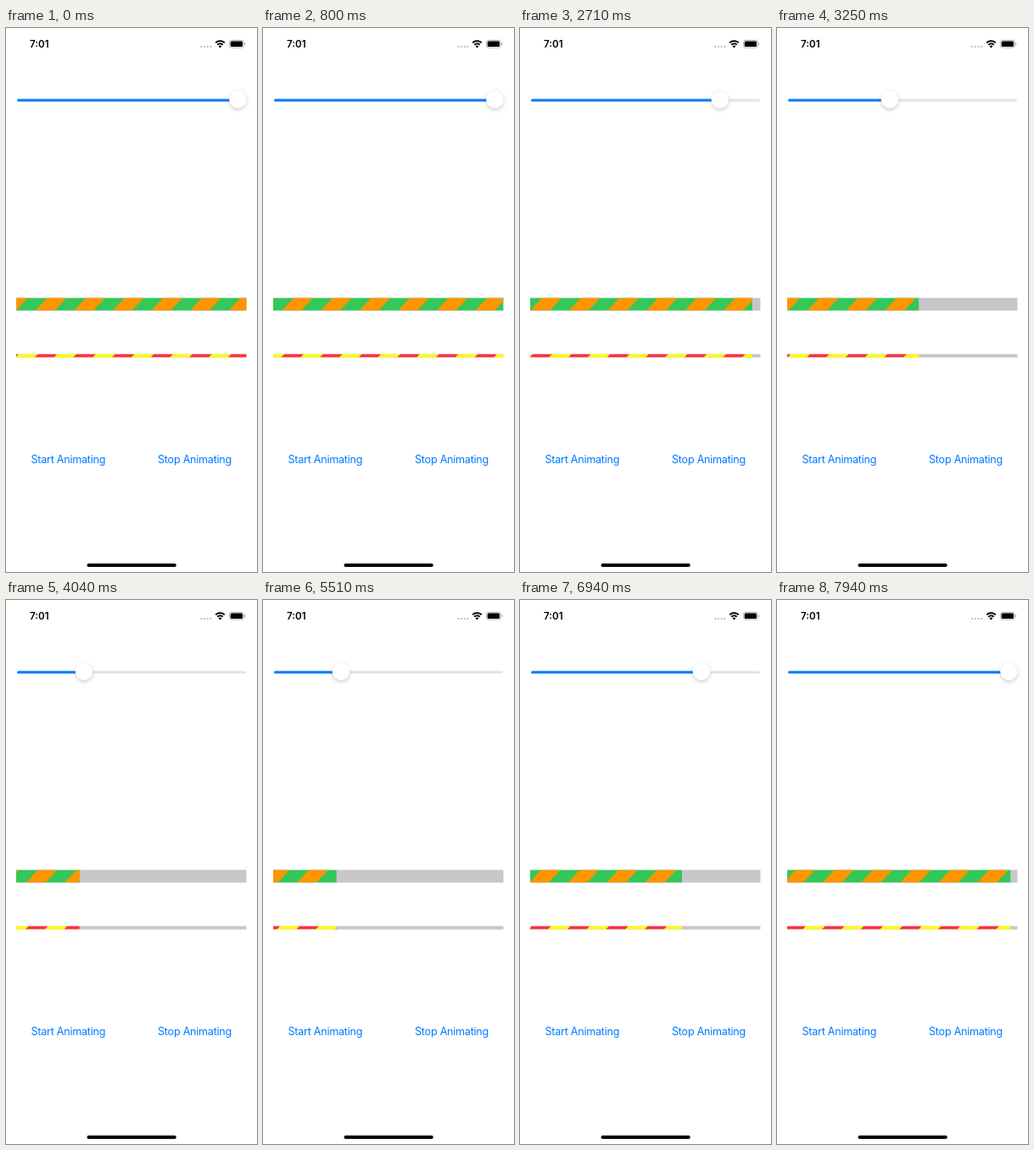
Recreate the animation shown at these times as an HTML page. Size 296 px wide and 640 px high, loop 8000 ms.

```html
<!DOCTYPE html>
<html lang="en">
<head>
<meta charset="utf-8">
<title>Striped progress bars</title>
<style>
  html, body { margin: 0; width: 100%; height: 100%; overflow: hidden; background: #fff; }
  svg { display: block; }
  #stage { width: 296px; height: 640px; }
  text { font-family: Inter, "Liberation Sans", sans-serif; }
  .button { font-size: 12.6px; letter-spacing: -.25px; fill: #007aff; text-anchor: middle; }
  .clock { font-size: 11.6px; font-weight: 600; }
  #knob { filter: drop-shadow(0 2.5px 2.5px rgba(0, 0, 0, .17)) drop-shadow(0 0 .6px rgba(0, 0, 0, .15)); }
</style>
</head>
<body>
<svg id="stage" viewBox="0 0 296 640">
  <!-- status bar -->
  <text class="clock" x="28" y="23">7:01</text>
  <g fill="#b5b5b7">
    <circle cx="230.3" cy="22" r="1.1"/><circle cx="234" cy="22" r="1.1"/>
    <circle cx="237.7" cy="22" r="1.1"/><circle cx="241.4" cy="22" r="1.1"/>
  </g>
  <g fill="none" stroke="#000" stroke-width="1.9">
    <path d="M247.2 17.4a7.6 7.6 0 0 1 10.6 0"/>
    <path d="M249.3 19.7a4.6 4.6 0 0 1 6.4 0"/>
  </g>
  <path d="M252.5 23.4l-1.9-2a2.7 2.7 0 0 1 3.8 0z"/>
  <rect x="263.4" y="14.4" width="17" height="8.7" rx="2.6" fill="none" stroke="#a4a4a4" stroke-width=".8"/>
  <rect x="264.7" y="15.6" width="14.4" height="6.3" rx="1.5"/>
  <path d="M281.3 17.3q1.2.4 1.2 1.5t-1.2 1.5z" fill="#a4a4a4"/>

  <!-- slider -->
  <rect x="13" y="83.4" width="270" height="3.2" rx="1.6" fill="#e4e4e5"/>
  <rect id="track" x="13" y="83.4" height="3.2" rx="1.6" fill="#007aff"/>
  <circle id="knob" cy="84" r="10.4" fill="#fff"/>

  <g id="bars"></g>

  <text class="button" x="73.3" y="511.5">Start Animating</text>
  <text class="button" x="222.5" y="511.5">Stop Animating</text>
  <rect x="95.5" y="630" width="105.3" height="4" rx="2"/>
</svg>
<script>
const LOOP = 8000, STEP = 111.8;
const LEFT = 12, WIDTH = 271.5;
const PERIOD = 45.6, SHIFT = 4.766, START = 22.5;
const LAG = 200;

// [time, slider value]
const drag = [
  [2380, 1], [2483, .965], [2683, .85], [3000, .6], [3360, .36], [3600, .275],
  [6200, .275], [6300, .3], [6732, .66], [6932, .762], [7160, .8], [7738, .97], [7850, 1]
];

function valueAt(t) {
  const i = drag.findIndex(key => key[0] > t);
  if (i <= 0) return 1;
  const [t0, v0] = drag[i - 1], [t1, v1] = drag[i];
  return v0 + (v1 - v0) * (t - t0) / (t1 - t0);
}

function add(parent, tag, attrs) {
  const el = document.createElementNS("http://www.w3.org/2000/svg", tag);
  for (const name in attrs) el.setAttribute(name, attrs[name]);
  return parent.appendChild(el);
}

function makeBar(y, height, base, accent, offset) {
  const slant = height * .94;
  let d = "";
  for (let i = -2; i < 7; i++) {
    d += `M${i * PERIOD} ${height}l${slant} ${-height}h${PERIOD / 2}l${-slant} ${height}z`;
  }
  const group = document.getElementById("bars");
  add(group, "rect", { x: LEFT, y, width: WIDTH, height, fill: "#c7c7c9" });
  const fill = add(group, "svg", { x: LEFT, y, height, overflow: "hidden" });
  add(fill, "rect", { width: WIDTH, height, fill: base });
  const stripes = add(fill, "path", { d, fill: accent });
  return (value, phase) => {
    fill.setAttribute("width", value * WIDTH);
    stripes.setAttribute("transform", `translate(${phase + offset} 0)`);
  };
}

const bars = [
  makeBar(317.5, 15, "#34c759", "#ff9500", 0),
  makeBar(383.6, 4, "#ffff00", "#ff2d55", -.7)
];
const track = document.getElementById("track");
const knob = document.getElementById("knob");

function draw(now) {
  // the picture advances in held steps
  const step = Math.floor(now % LOOP / STEP), t = step * STEP;
  const x = 23.2 + 250.3 * valueAt(t);
  knob.setAttribute("cx", x);
  track.setAttribute("width", x - 13);
  const phase = (START + step * SHIFT) % PERIOD;
  bars.forEach(update => update(valueAt(t - LAG), phase));
}

const begin = performance.now();
function tick() {
  draw(performance.now() - begin);
  requestAnimationFrame(tick);
}
tick();
</script>
</body>
</html>
```
